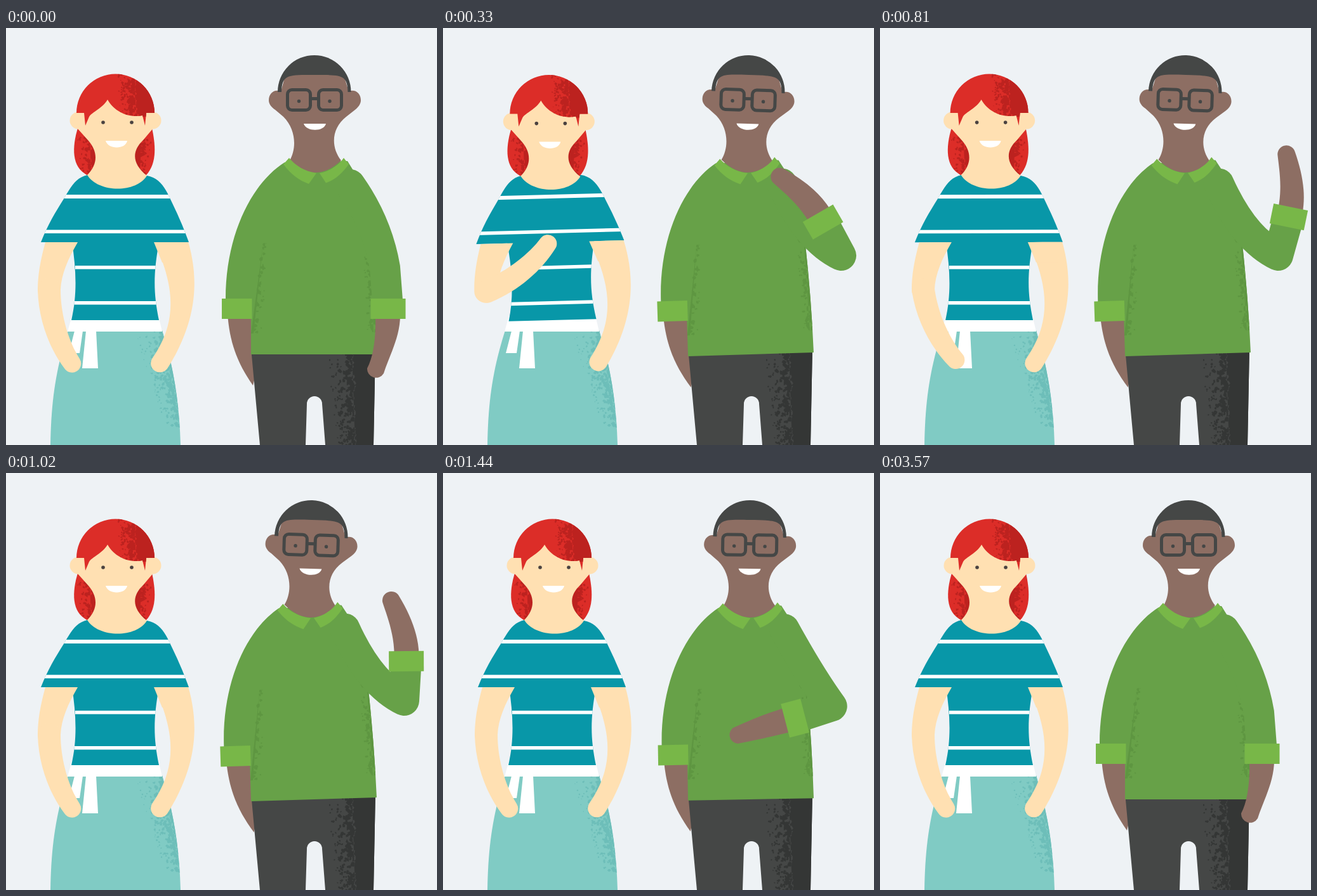
An HTML page that plays this animation: 679 by 658 pixels, repeating every 5.57 s.

```html
<!DOCTYPE html>
<html lang="en">
<head>
<meta charset="utf-8">
<title>Two people, one waving</title>
<style>
  html, body { margin: 0; width: 100%; height: 100%; overflow: hidden; background: #eef2f5; }
  svg { display: block; width: 100%; height: 100%; }
  .red { fill: #dc2d28; } .red2 { fill: #bc221f; }
  .pale { fill: #ffe0b2; } .teal { fill: #0897a8; }
  .mint { fill: #80cbc4; } .mint2 { fill: #6dbeb9; }
  .white { fill: #fff; } .brown { fill: #8d6e63; }
  .green { fill: #67a148; } .green2 { fill: #5e9641; } .lime { fill: #78b748; }
  .coal { fill: #454746; } .coal2 { fill: #343635; }
  .line { fill: none; stroke: #454746; stroke-width: 5; }
  #sleeve { fill: none; stroke: #67a148; stroke-width: 48; stroke-linecap: round; stroke-linejoin: round; }
</style>
</head>
<body>
<svg viewBox="0 0 679 658" preserveAspectRatio="none">
  <defs>
    <clipPath id="skirtClip"><path id="skirtShape" d="M98 477H246C264 535 273 590 275 658H70C71 590 78 540 98 477Z"/></clipPath>
    <clipPath id="pantsClip"><path id="pantsShape" d="M386 505L400 658H472L474 593A12 12 0 0 1 498 593L503 658H579L582 505Z"/></clipPath>
    <clipPath id="capClip"><path id="capShape" d="M111 134A61.5 61.5 0 0 1 234 134H221L219 154L215 138C195 142 172 134 160 113C152 127 136 132 131 140L125 154L123 134Z"/></clipPath>
    <clipPath id="locksClip"><path id="locksShape" d="M113 158C104 188 103 220 128 232H221C239 212 235 182 230 158Z"/></clipPath>
    <clipPath id="shirtClip">
      <path id="shirtShape" d="M128 232C110 236 102 251 92 268C77 292 66 310 55 338H104C110 378 113 418 103 461H241C232 418 232 388 241 338H288C278 310 269 291 258 268C250 251 241 236 222 233Z"/>
    </clipPath>
    <clipPath id="torsoClip">
      <path id="torsoShape" d="M439 212C388 244 346 325 346 427V440H386V515H584Q583 430 576 340L560 262L546 223L538 210Z"/>
    </clipPath>
  </defs>

  <!-- woman -->
  <use href="#skirtShape" class="mint"/>
  <g clip-path="url(#skirtClip)"><path id="skirtTex" class="mint2"/></g>
  <path class="white" d="M104 454H240L246 479H97ZM126 478H142L145 537H120ZM108 478H121L116 513H99Z"/>
  <g id="herBody">
    <path class="pale" d="M285 330C302 385 307 453 255 536A13.5 13.5 0 0 1 230 522C269 466 269 410 230 330Z"/>
    <use href="#shirtShape" class="teal"/>
    <path class="pale" d="M62 338C54 367 50 390 50 413A18 18 0 0 0 86 413C87 388 98 364 113 338ZM233 338H286L280 370H246Z"/>
    <g clip-path="url(#shirtClip)">
      <path class="white" d="M50 263H300V269H50ZM50 318.500H300V324H50ZM109 375H236V380.500H109ZM106 431H238V436.500H106Z"/>
    </g>
    <g id="herArm">
      <path class="pale" d="M50 413C51 460 68 505 92 537A14 14 0 0 0 116 522C100 497 86 455 86 413A18 18 0 0 0 50 413Z"/>
    </g>
  </g>
  <g id="herHead">
    <use href="#locksShape" class="red"/>
    <g clip-path="url(#locksClip)"><path id="locksTex" class="red2"/></g>
    <path class="pale" d="M124 108H222L232 158L216 177C199 193 197 213 222 233C205 261 145 260 128 232C147 213 143 193 130 178L113 159Z"/>
    <circle class="pale" cx="114" cy="146" r="13.500"/>
    <circle class="pale" cx="231" cy="146" r="13.500"/>
    <use href="#capShape" class="red"/>
    <g clip-path="url(#capClip)"><path id="capTex" class="red2"/></g>
    <g fill="#4a4240"><circle cx="153" cy="149" r="2.800"/><circle cx="198" cy="149" r="2.800"/></g>
    <path class="white" d="M157 178H191C188 192 161 192 157 178Z"/>
  </g>

  <!-- man -->
  <path class="brown lean" d="M349 450C352 498 366 531 389 564L400 520V450Z"/>
  <use href="#pantsShape" class="coal"/>
  <g clip-path="url(#pantsClip)"><path id="pantsTex" class="coal2"/></g>
  <g class="lean">
    <use href="#torsoShape" class="green"/>
    <g clip-path="url(#torsoClip)"><path id="torsoTex" class="green2"/></g>
    <rect class="lime" x="340" y="427" width="47.500" height="32"/>
  </g>
  <path id="sleeve"/>
  <g id="hisHead">
    <path class="brown" d="M433 100L442 68H530L540 100C550 96 559 103 559 114C559 120 555 125 550 129L536 140C513 158 511 187 528 209Q488 247 447 209C458 190 457 160 437 140L424 129C418 125 414 120 414 114C414 103 423 96 433 100Z"/>
    <path class="coal" d="M428 101A57.700 58 0 0 1 543.500 101H538.500C538 73 528 74 486 74C444 74 435 73 434 101Z"/>
    <rect class="line" x="443.500" y="97.500" width="36" height="32" rx="7"/>
    <rect class="line" x="492.500" y="97.500" width="36" height="32" rx="7"/>
    <path class="line" d="M480 111.500H492.500"/>
    <g class="coal"><circle cx="461.500" cy="115.500" r="2.700"/><circle cx="510" cy="115.500" r="2.700"/></g>
    <path class="white" d="M469 151H504C501 164 473 164 469 151Z"/>
  </g>
  <path class="lime lean" d="M446 205L437 215C449 231 461 240 477 246L489 229C470 226 456 217 446 205ZM532 205L540 215C528 231 519 239 504 244.500L494 229C509 226 523 218 532 205Z"/>
  <g id="hisArm">
    <path id="hand" class="brown"/>
    <rect class="lime" x="-27.500" y="-16" width="55" height="32"/>
  </g>
</svg>
<script>
const LOOP = 5570, STEP = 30;
const $ = id => document.getElementById(id);
const set = (id, name, value) => $(id).setAttribute(name, value);
const mix = (a, b, u) => a + (b - a) * u;

// Monotone cubic through [time, value] keys, flat at turning points
function curve(...keys) {
  const rate = i => (keys[i + 1][1] - keys[i][1]) / (keys[i + 1][0] - keys[i][0]);
  const slope = keys.map((_, i) => {
    if (!i || i === keys.length - 1) return 0;
    const a = rate(i - 1), b = rate(i);
    return a * b > 0 ? 2 * a * b / (a + b) : 0;
  });
  return t => {
    if (t <= keys[0][0]) return keys[0][1];
    const i = keys.findIndex((k, n) => n < keys.length - 1 && t < keys[n + 1][0]);
    if (i < 0) return keys[keys.length - 1][1];
    const [t0, v0] = keys[i], [t1, v1] = keys[i + 1];
    const w = t1 - t0, u = (t - t0) / w, s = u * u * (3 - 2 * u);
    return mix(v0, v1, s) + w * u * (1 - u) * (slope[i] * (1 - u) - slope[i + 1] * u);
  };
}

// Solid area between edge and far, with grains thinning out towards the soft side.
// Each side is given as its x at the top and at the bottom.
function grain(seed, n, y0, y1, soft, edge, far) {
  const rnd = () => (seed = (seed * 16807) % 2147483647) / 2147483647;
  let d = `M${edge[0]} ${y0}L${edge[1]} ${y1}H${far[1]}L${far[0]} ${y0}Z`;
  for (let i = 0; i < n; i++) {
    const v = rnd(), y = mix(y0, y1, v), u = rnd() ** 1.6;
    const x = mix(mix(edge[0], edge[1], v), mix(soft[0], soft[1], v), u);
    const r = mix(3.3, 1.1, u) * (0.6 + rnd() * 0.6);
    for (let k = 0; k < 6; k++) {
      const a = k * Math.PI / 3, q = r * (0.5 + rnd());
      d += (k ? "L" : "M") + (x + q * Math.cos(a)).toFixed(1) + " " + (y + q * Math.sin(a)).toFixed(1);
    }
    d += "Z";
  }
  return d;
}
set("skirtTex", "d", grain(11, 210, 478, 630, [202, 252], [246, 274], [290, 290]));
set("pantsTex", "d", grain(23, 230, 508, 658, [507, 520], [545, 550], [600, 600]));
set("capTex", "d", grain(37, 110, 72, 140, [176, 180], [200, 206], [240, 240]));
set("locksTex", "d", grain(41, 45, 172, 232, [112, 118], [132, 134], [150, 150])
  + grain(43, 35, 176, 232, [230, 222], [213, 211], [190, 190]));
set("torsoTex", "d", grain(53, 40, 340, 482, [410, 404], [405, 390], [405, 386])
  + grain(59, 45, 336, 480, [562, 570], [574, 579], [590, 590]));

const herLift = curve([30, 0], [330, 1], [600, 1], [850, 0]);
const hisLift = curve([30, 0], [330, 1], [1290, 1], [1600, 0]);
const wave = curve([30, -180], [330, -30], [480, 13.5], [660, -1], [840, 12.5],
  [1000, -1], [1145, 13], [1260, -1], [1330, -32], [1600, -180]);

function drawHer(w) {
  set("herBody", "transform", `translate(${0.5 * w} 0) rotate(${-1.5 * w} 172 460)`);
  set("herHead", "transform", `translate(${-5.7 * w} ${1.6 * w})`);
  set("herArm", "transform", `translate(${2 * w} 0) rotate(${-109.5 * w} 68 413)`);
}

function drawHim(r, tilt) {
  for (const el of document.querySelectorAll(".lean"))
    el.setAttribute("transform", `rotate(${-1.8 * r} 485 515)`);
  set("hisHead", "transform", `translate(${-7.5 * r} 0) rotate(${1.8 * r} 485 180)`);

  const a = tilt * Math.PI / 180, sin = Math.sin(a), cos = Math.cos(a);
  const ex = mix(601, 632, r), ey = mix(378, 362, r);
  const cx = ex - cos + 65 * sin, cy = ey - sin - 65 * cos;
  set("sleeve", "d", `M${542 - 8.3 * r} ${247 - 1.5 * r}`
    + `Q${mix(585, 573, r)} ${mix(308, 333, r)} ${ex - 4 - r} ${ey - 3 * r}L${cx} ${cy}`);
  set("hisArm", "transform", `translate(${cx} ${cy}) rotate(${tilt})`);

  const h = mix(20, -24, r);
  set("hand", "d", `M-19 -10C-19 -45 ${-15 + 0.68 * h} -75 ${h - 13} ${-98 - 0.2 * h}`
    + `A14 14 0 0 1 ${h + 13} ${-98 + 0.2 * h}C${15 + 0.4 * h} -75 19 -45 20 -10Z`);
}

function frame(now) {
  const t = Math.floor((now % LOOP) / STEP) * STEP;
  drawHer(herLift(t));
  drawHim(hisLift(t), wave(t));
  requestAnimationFrame(frame);
}
frame(0);
</script>
</body>
</html>
```
